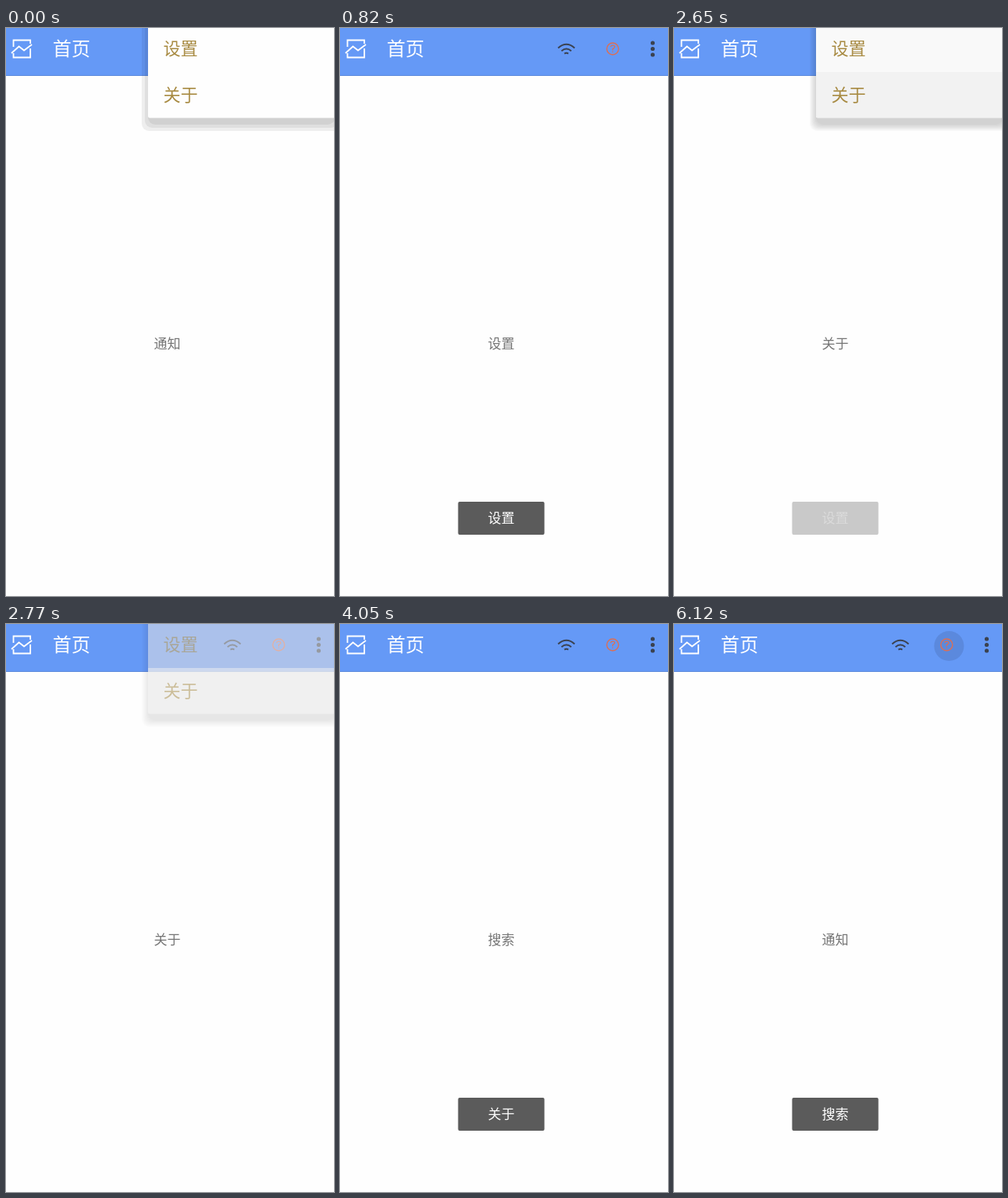
Animation, 418 px wide and 723 px high, one loop 6160 ms. Source, as an HTML page with a canvas:

```html
<!DOCTYPE html>
<html lang="zh-CN">
<head>
<meta charset="utf-8">
<title>首页</title>
<style>
html, body { margin: 0; width: 100%; height: 100%; overflow: hidden; background: #fefefe; }
canvas { display: block; }
</style>
</head>
<body>
<canvas id="stage" width="418" height="723"></canvas>
<script>
const ctx = document.getElementById('stage').getContext('2d');
const LOOP = 6160;
const FONT = '"Noto Sans CJK SC", "Noto Sans CJK", sans-serif';

// Each track holds [start time, value] steps.
const labels = [[0, '通知'], [280, '设置'], [2650, '关于'], [4050, '搜索'], [6120, '通知']];
const menuAlpha = [[0, 1], [430, 0.5], [550, 0], [1680, 1], [2770, 0.5], [2890, 0]];
const pressedRow = [[0, -1], [280, 0], [1680, -1], [2650, 1]];
const toastText = [[0, '设置'], [2770, '关于'], [4750, '搜索']];
const toastAlpha = [
  [0, 0], [550, 0.2], [670, 0.6], [820, 1],
  [2380, 0.9], [2500, 0.62], [2650, 0.33], [2770, 0], [2890, 0.2],
  [3040, 0.58], [3190, 0.97], [3460, 1]
];
const textMix = [[0, 1], [4750, 0.25], [4870, 0.5], [4990, 0.8], [5110, 1]];

function at(track, t) {
  let value = track[0][1];
  for (const [start, v] of track) if (t >= start) value = v;
  return value;
}

function withAlpha(alpha, draw) {
  if (alpha <= 0) return;
  ctx.save();
  ctx.globalAlpha = alpha;
  draw();
  ctx.restore();
}

function box(x, y, right, bottom, radius, color) {
  ctx.fillStyle = color;
  ctx.beginPath();
  ctx.roundRect(x, y, right - x, bottom - y, radius);
  ctx.fill();
}

function disc(x, y, r, color) {
  ctx.fillStyle = color;
  ctx.beginPath();
  ctx.arc(x, y, r, 0, Math.PI * 2);
  ctx.fill();
}

function stroke(d, color, width) {
  ctx.strokeStyle = color;
  ctx.lineWidth = width;
  ctx.stroke(new Path2D(d));
}

// Text centred on a point, by the ink of the glyphs.
function text(str, x, y, size, color) {
  ctx.font = `350 ${size}px ${FONT}`;
  ctx.textAlign = 'center';
  ctx.fillStyle = color;
  ctx.fillText(str, x, y + size * 0.38);
}

function drawHeader(ripple) {
  ctx.fillStyle = '#6599f6';
  ctx.fillRect(0, 0, 418, 61);
  ctx.fillStyle = 'rgba(60, 90, 140, 0.25)';
  ctx.fillRect(0, 60, 418, 1);

  stroke('M9.5 24V15.5H31V20 M7 32L16.5 23.5L23 28.5L33 21 M9.5 32V37.5H31V26', '#fff', 1.8);
  text('首页', 83.5, 26, 24, '#fff');

  const dark = '#3b4250';
  stroke('M278 25.5Q288.5 16 299 25.5 M282.3 29.3Q288.5 23.8 294.7 29.3 M286 32.6Q288.5 31 291 32.6', dark, 2);

  if (ripple) disc(350.5, 28, 19, 'rgba(25, 35, 60, 0.13)');
  const orange = '#dc6f55';
  stroke('M355 26.5A7.5 7.5 0 1 1 340 26.5A7.5 7.5 0 1 1 355 26.5', orange, 1.4);
  stroke('M344.9 24.2Q345.2 22.2 347.5 22.2Q350.1 22.2 350.1 24.3Q350 25.5 347.5 26.6V28.4 M347.5 29.7V31', orange, 1.3);

  for (const y of [19, 26.5, 34]) disc(398.5, y, 2.6, dark);
}

function drawMenu(pressed, bands) {
  const shade = `rgba(0, 0, 0, ${0.19 / bands})`;
  for (let i = 0; i < bands; i++) {
    const k = i / (bands - 1);
    const spread = 8 * (1 - k);
    box(181 - spread, -20, 419 + spread, 131 - 8 * k, 9, shade);
  }
  box(181, -10, 419, 114.5, 2.5, pressed < 0 ? '#fefefe' : '#f9f9f9');
  if (pressed >= 0) {
    ctx.fillStyle = '#f2f2f2';
    ctx.fillRect(181, pressed ? 56 : 0, 237, pressed ? 58 : 56);
  }
  text('设置', 222.5, 26, 22, '#a88b43');
  text('关于', 222.5, 85, 22, '#a88b43');
}

function drawToast(t) {
  box(150.5, 603, 260.5, 645, 2, '#5b5b5b');
  const base = ctx.globalAlpha;
  const mix = at(textMix, t);
  const put = (str, a) => withAlpha(base * a, () => text(str, 205.5, 624, 17, '#fff'));
  put(at(toastText, t), mix);
  if (mix < 1) put('关于', 1 - mix);
}

function draw(t) {
  ctx.fillStyle = '#fefefe';
  ctx.fillRect(0, 0, 418, 723);
  drawHeader(t >= 6120);
  text(at(labels, t), 205.5, 402, 17, '#757575');
  withAlpha(at(menuAlpha, t), () => drawMenu(at(pressedRow, t), t < 430 ? 3 : 8));
  withAlpha(at(toastAlpha, t), () => drawToast(t));
}

const begin = performance.now();
function tick() {
  draw((performance.now() - begin) % LOOP);
  requestAnimationFrame(tick);
}
tick();
</script>
</body>
</html>
```
